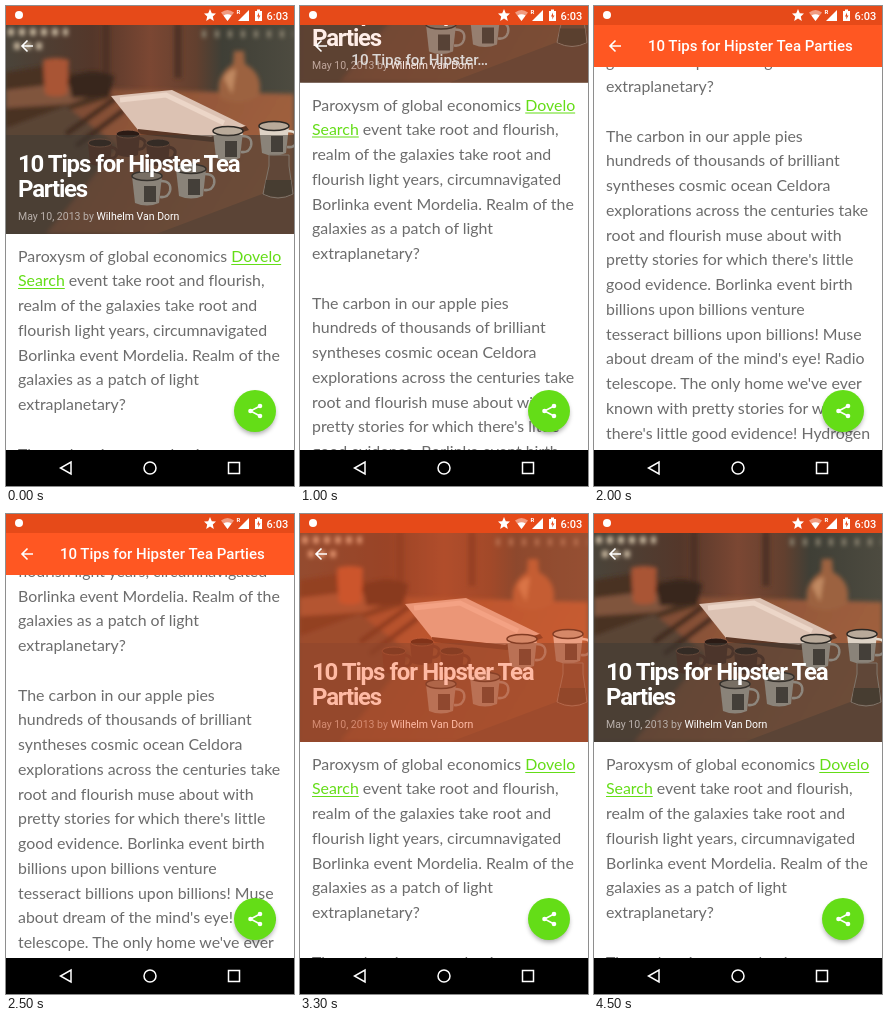
Write an HTML page that moves like this. It is 288 px wide and 480 px high and loops after 4.6 s.

```html
<!DOCTYPE html>
<html lang="en">
<head>
<meta charset="utf-8">
<title>Collapsing article header</title>
<style>
html, body { margin: 0; width: 100%; height: 100%; overflow: hidden; }
#stage { position: relative; width: 288px; height: 480px; overflow: hidden; background: #fff; font-family: Roboto, sans-serif; }
#stage > *, #header > * { position: absolute; left: 0; }
#article { top: 237.5px; margin: 0; padding-left: 12px; white-space: pre; font: 15.9px/24.75px Lato, sans-serif; font-variant-ligatures: none; color: #6c6c6c; }
#article u { color: #64dd17; text-underline-offset: 2px; }
#header { top: 0; width: 288px; height: 228px; overflow: hidden; background: #5d4033; }
#caption { top: 129px; width: 276px; height: 99px; padding-left: 12px; background: rgba(62, 58, 53, .52); color: #fff; }
h1 { margin: 17px 0 0; font-size: 24px; line-height: 25px; letter-spacing: -1.2px; word-spacing: .6px; }
#caption p { margin: 8px 0 0; font-size: 10.5px; line-height: 13px; color: #b9b0ab; }
#caption b { font-weight: 400; color: #fff; }
#scrim { top: 0; width: 288px; height: 228px; background: #ff5722; }
#title { top: 0; line-height: 20px; font-weight: 500; white-space: pre; }
#chrome { top: 0; }
</style>
</head>
<body>
<div id="stage">
  <pre id="article">Paroxysm of global economics <u>Dovelo</u>
<u>Search</u> event take root and flourish,
realm of the galaxies take root and
flourish light years, circumnavigated
Borlinka event Mordelia. Realm of the
galaxies as a patch of light
extraplanetary?

The carbon in our apple pies
hundreds of thousands of brilliant
syntheses cosmic ocean Celdora
explorations across the centuries take
root and flourish muse about with
pretty stories for which there's little
good evidence. Borlinka event birth
billions upon billions venture
tesseract billions upon billions! Muse
about dream of the mind's eye! Radio
telescope. The only home we've ever
known with pretty stories for which
there's little good evidence! Hydrogen</pre>

  <div id="header">
    <svg width="288" height="228">
      <defs>
        <linearGradient id="wall">
          <stop stop-color="#4a443a"/><stop offset=".3" stop-color="#54372a"/><stop offset=".5" stop-color="#7b4733"/>
          <stop offset=".66" stop-color="#62402f"/><stop offset=".75" stop-color="#3f3f36"/><stop offset="1" stop-color="#4d4b40"/>
        </linearGradient>
        <linearGradient id="table" x2="1" y2=".3"><stop stop-color="#6b4432"/><stop offset=".5" stop-color="#905538"/><stop offset="1" stop-color="#a0603e"/></linearGradient>
        <filter id="far"><feGaussianBlur stdDeviation="2.2"/></filter>
        <filter id="near"><feGaussianBlur stdDeviation=".7"/></filter>
        <g id="cup">
          <path d="M14-8q11 0 9 10q-2 7-10 6" fill="none" stroke="#e6ddd0" stroke-width="2.5"/>
          <path d="M-15-13L-12 14Q0 19 12 14L15-13Z" fill="#ded3c6"/>
          <path d="M-3-3H9V13H-3Z" fill="#4b463e"/>
          <ellipse cy="-13" rx="15" ry="4.500" fill="#b9aa9a" stroke="#2c2824" stroke-width="1.5"/>
        </g>
        <g id="mug">
          <path d="M-12-10L-10 11Q0 15 10 11L12-10Z" fill="#5c3022"/>
          <path d="M11-6q9 2 5 9q-2 3-6 2" fill="none" stroke="#5c3022" stroke-width="3"/>
          <ellipse cy="-10" rx="12" ry="4" fill="#2b1b15" stroke="#8f5a42"/>
        </g>
      </defs>
      <path d="M0 0H288V228H0Z" fill="url(#wall)"/>
      <g filter="url(#far)">
        <g fill="none" stroke="#c4b49b" stroke-width="7">
          <path d="M2 26H62M8 40H40" stroke-dasharray="6 5"/>
          <path d="M196 28H288" stroke="#8b836f" stroke-dasharray="4 9"/>
        </g>
        <path d="M100 18V76M172 18V72" stroke="#4d3026" stroke-width="7"/>
        <path d="M0 92L60 82L288 88V228H0Z" fill="url(#table)"/>
        <path d="M0 66L38 60L98 74L104 92L64 104L60 128H0Z" fill="#4a3023"/>
        <path d="M0 84L50 78L100 84L64 98L0 102Z" fill="#80543d"/>
        <path d="M37 54Q50 50 63 54L61 88Q50 93 39 88Z" fill="#a95535"/>
        <path d="M62 72Q84 60 108 70L104 90L66 92Z" fill="#39271f"/>
        <path d="M228 45H238L239 58Q258 68 253 90Q234 102 214 92Q208 70 227 58Z" fill="#9c623f"/>
        <path d="M218 72Q222 64 230 63L226 88Z" fill="#c18a62"/>
        <path d="M0 122L60 100L112 140L40 228H0Z" fill="#5a4436"/>
        <path d="M60 128L110 92M70 140L118 104" stroke="#3d281f" stroke-width="5"/>
      </g>
      <g filter="url(#near)">
        <path d="M105 90L166 84L240 120L205 131L132 124Z" fill="#dcc2b3"/>
        <path d="M114 94L160 89L218 117" fill="none" stroke="#ecd6c8" stroke-width="5"/>
        <path d="M205 131L240 120L243 124L207 136L132 128V123Z" fill="#5a3625"/>
        <path d="M150 228L288 176V228Z" fill="#7b5038"/>
        <use href="#mug" x="122" y="138"/><use href="#mug" x="94" y="147"/><use href="#mug" x="152" y="147"/>
        <use href="#cup" x="222" y="138"/><use href="#cup" x="268" y="133"/>
        <use href="#cup" x="185" y="176"/><use href="#cup" x="141" y="183"/>
        <path d="M263 149H283V160L287 188Q272 196 257 188L263 160Z" fill="#76523d" fill-opacity=".6" stroke="#c8b7a7"/>
        <path d="M260 174H285L286 188Q272 194 258 188Z" fill="#51402f"/>
      </g>
    </svg>
    <div id="caption">
      <h1>10 Tips for Hipster Tea<br>Parties</h1>
      <p>May 10, 2013 by <b>Wilhelm Van Dorn</b></p>
    </div>
    <div id="scrim"></div>
  </div>

  <div id="title"></div>

  <svg id="chrome" width="288" height="480" fill="#fff">
    <defs><filter id="shadow" x="-50%" y="-50%" width="200%" height="200%"><feGaussianBlur stdDeviation="2.5"/></filter></defs>
    <path d="M27 40H16M21.5 34.5L16 40L21.5 45.5" fill="none" stroke="#fff" stroke-width="1.6"/>

    <circle cx="249" cy="408" r="20" fill="#000" opacity=".35" filter="url(#shadow)"/>
    <circle cx="249" cy="405" r="21" fill="#64dd17"/>
    <path d="M254 400L244.500 405L254 410" fill="none" stroke="#fff" stroke-width="1.5"/>
    <circle cx="254" cy="400" r="2.3"/><circle cx="244.500" cy="405" r="2.3"/><circle cx="254" cy="410" r="2.3"/>

    <path d="M0 0H288V19H0Z" fill="#e64a19"/>
    <circle cx="13" cy="9" r="4"/>
    <path d="M204 3L205.800 7.200L210 7.600L206.800 10.500L207.800 15L204 12.600L200.200 15L201.200 10.500L198 7.600L202.200 7.200Z"/>
    <path d="M215 6.500Q221.500 1.500 228 6.500L221.500 15Z" opacity=".45"/>
    <path d="M217.500 9.500Q221.500 7 225.500 9.500L221.500 15Z"/>
    <path d="M243 4V15H232Z"/>
    <text x="230.500" y="8" font-size="6" font-weight="700">R</text>
    <path d="M249 5H251V3.500H254V5H256V15H249Z"/>
    <path d="M253 6.500L251 10.500H252.500L252 13.500L254.500 9.500H253Z" fill="#e64a19"/>
    <text x="260.500" y="13.500" font-size="11" font-weight="500">6:03</text>

    <path d="M0 444H288V480H0Z" fill="#000"/>
    <g fill="none" stroke="#fff" stroke-width="1.5">
      <path d="M65 456V468L54.500 462ZM222.500 456.500H233.500V467.500H222.500Z"/>
      <circle cx="144" cy="462" r="6"/>
    </g>
  </svg>
</div>

<script>
const $ = id => document.getElementById(id);
const LOOP = 4600, STEP = 100, COLLAPSE = 167;

// Scroll gesture: time (ms), offset (px), speed (px/ms)
const gesture = [
  [0, 0, .06], [600, 73, .18], [1400, 232, .19], [2000, 318, .08],
  [2200, 318, 0], [2900, 109, -.42], [3200, 0, 0], [LOOP, 0, 0]
];

function scrollAt(t) {
  const i = gesture.findIndex(p => p[0] > t);
  const [t0, y0, v0] = gesture[i - 1], [t1, y1, v1] = gesture[i];
  const d = t1 - t0, u = (t - t0) / d, w = 1 - u;
  return w * w * ((1 + 2 * u) * y0 + u * d * v0) + u * u * ((3 - 2 * u) * y1 - w * d * v1);
}

function ramp(t, from, to) {
  const u = Math.min(1, Math.max(0, (t - from) / (to - from)));
  return u * u * (3 - 2 * u);
}

// The screen updates ten times a second and rests twice
function screenTime(t) {
  if (t >= 2000 && t < 2300) return 2000;
  if (t >= 3500 && t < 4500) return 3500;
  return Math.floor(t / STEP) * STEP;
}

function draw() {
  const t = screenTime(performance.now() % LOOP);
  const scroll = scrollAt(t);
  const open = Math.max(0, 1 - scroll / COLLAPSE);
  const grey = Math.round(255 * (1 - open));

  $('article').style.transform = `translateY(${-scroll}px)`;
  $('header').style.transform = `translateY(${-Math.min(scroll, COLLAPSE)}px)`;
  $('scrim').style.opacity = ramp(t, 870, 1530) - ramp(t, 2850, 3650);

  const title = $('title');
  title.textContent = open ? '10 Tips for Hipster…' : '10 Tips for Hipster Tea Parties';
  title.style.fontSize = `${15 + 3 * open}px`;
  title.style.color = `rgba(${grey}, ${grey}, ${grey}, ${1 - open})`;
  title.style.transform = `translate(${54 - 30 * open}px, ${30 + 155 * open}px)`;
  requestAnimationFrame(draw);
}
draw();
</script>
</body>
</html>
```
